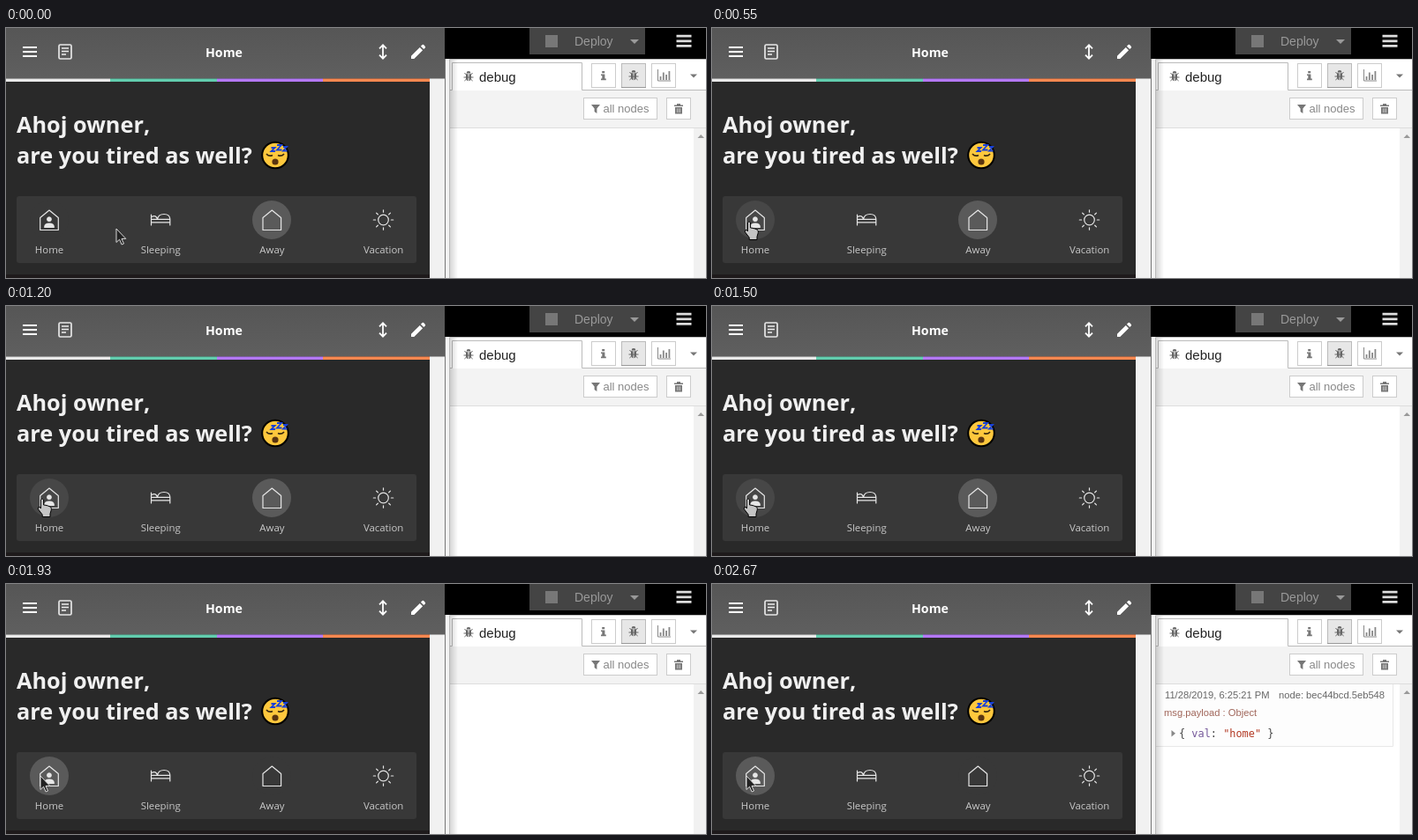
Recreate the animation shown at these times as an HTML page. Size 793x284 px, loop 2.73 s.

```html
<!DOCTYPE html>
<html lang="en">
<head>
<meta charset="utf-8">
<title>Dashboard and debug panel</title>
<style>
  html, body { margin: 0; width: 100%; height: 100%; overflow: hidden; background: #fff; }
  svg { display: block; width: 793px; height: 284px; }
  .ui { font-family: "Open Sans", "Noto Sans", sans-serif; }
  .side { font-family: "Liberation Sans", Arial, sans-serif; }
  .code { font: 11.9px "DejaVu Sans Mono", monospace; white-space: pre; }
  .head { font-size: 25.3px; font-weight: 700; fill: #f0f0f0; }
  .label { font-size: 11.4px; fill: #c8c8c8; text-anchor: middle; }
  .meta { font-size: 11.2px; fill: #666; }
  .line { fill: none; stroke: #e6e6e6; stroke-width: 1.2; stroke-linejoin: round; stroke-linecap: round; }
  .btn { fill: #fff; stroke: #ccc; }
  .cursor { stroke-width: 1; stroke-linejoin: round; }
</style>
</head>
<body>
<svg viewBox="0 0 793 284">
  <defs>
    <linearGradient id="bar" x2="0" y2="1">
      <stop stop-color="#565656"/><stop offset="1" stop-color="#5f5f5f"/>
    </linearGradient>
    <linearGradient id="shade">
      <stop stop-color="#000" stop-opacity=".16"/><stop offset="1" stop-color="#000" stop-opacity="0"/>
    </linearGradient>
    <path id="house" class="line" d="M38.7 215.5L49 207L59.3 215.5V229.5H38.7Z"/>
    <g id="bug" fill="#666" stroke="#666">
      <path d="M-2.4-3.6A2.4 2.4 0 0 1 2.4-3.6Z" stroke="none"/>
      <path d="M-3-2.8H-.5V5.2A3 3.6 0 0 1-3 1.6ZM3-2.8H.5V5.2A3 3.6 0 0 0 3 1.6Z" stroke="none"/>
      <path d="M-5.5 1H5.5M-4.6-4L-2.6-2M4.6-4L2.6-2M-4.6 5L-2.4 3M4.6 5L2.4 3" fill="none"/>
    </g>
  </defs>

  <g class="ui">
    <rect width="480" height="284" fill="#292929"/>
    <rect y="280" width="480" height="4" fill="#1e1a1b"/>
    <rect x="480" y="57" width="17" height="227" fill="#f1f1f1"/>
    <rect width="497" height="57.5" fill="url(#bar)"/>
    <g id="stripes"></g>

    <path d="M19 22H35M19 27H35M19 32H35" stroke="#fff" stroke-width="2"/>
    <rect x="60" y="19" width="14" height="16" rx="1.5" class="line" style="stroke-width:1.7"/>
    <path d="M63 23H71M63 26.5H71M63 30H68" stroke="#eee" stroke-width="1.4"/>
    <text x="247" y="32.5" text-anchor="middle" font-size="14.2" font-weight="700" fill="#fff">Home</text>
    <path d="M427 20V34M423 23.3L427 19.3L431 23.3M423 30.7L427 34.7L431 30.7" fill="none" stroke="#fff" stroke-width="1.8"/>
    <path d="M459 35V31.7L468.8 21.9L472.1 25.2L462.3 35ZM469.9 20.8L471.6 19.1Q472.4 18.6 473.1 19.1L474.9 20.9Q475.4 21.6 474.9 22.4L473.2 24.1Z" fill="#fff"/>

    <text class="head" x="12" y="119">Ahoj owner,</text>
    <text class="head" x="12" y="154">are you tired as well?</text>
    <circle cx="305" cy="144.5" r="14.8" fill="#ffc83d" stroke="#000" stroke-width="2"/>
    <path d="M295 143Q298 146.5 302 144.5M308 144.5Q312 146.5 315 143" fill="none" stroke="#3a2a10" stroke-width="1.7"/>
    <ellipse cx="305" cy="152" rx="3.6" ry="3.6" fill="#5a3510"/>
    <path d="M300.5 136H304.5L300.5 140H305M307 133H312L307 138.5H312.5M314 135H318L314 139.5H318.5" fill="none" stroke="#1740d8" stroke-width="1.8"/>

    <rect x="12" y="191" width="453" height="76" rx="3" fill="#383838"/>
    <circle id="homeDisc" cx="49" cy="218" r="22" fill="#383838"/>
    <circle id="awayDisc" cx="301" cy="218" r="22" fill="#5a5a5a"/>
    <use href="#house"/>
    <path d="M49 214.3A2.9 2.9 0 1 1 48.9 214.3ZM43.2 227V225.2Q43.6 221.4 49 221.4T54.8 225.2V227Z" fill="#e6e6e6"/>
    <path class="line" d="M164.5 212V224M164.5 220.8H185.8M185.8 224V217Q185.5 211.5 179 211.5Q172.5 211.5 171.5 217.3M164.5 217.3H185.8M165 214.5Q170 212 171.5 217"/>
    <use href="#house" x="252.3"/>
    <circle class="line" cx="427.5" cy="218" r="5.8"/>
    <g id="rays" class="line"></g>
    <g id="labels"></g>
  </g>

  <g class="side">
    <rect x="497" width="296" height="35" fill="#000"/>
    <rect x="593" width="131" height="30" fill="#444"/>
    <rect x="611" y="8" width="14" height="14" fill="#777"/>
    <text x="644" y="20" font-size="14" fill="#999">Deploy</text>
    <path d="M707 13H717L712 18Z" fill="#999"/>
    <path d="M759.5 9.2H776.5M759.5 14.8H776.5M759.5 20.4H776.5" stroke="#ddd" stroke-width="2.8"/>

    <rect x="497" y="35" width="296" height="249" fill="#fff"/>
    <rect x="498" y="35" width="4" height="249" fill="#f3f3f3"/>
    <path d="M497.5 35V284" stroke="#777"/>
    <rect x="502" y="71" width="291" height="42" fill="#f3f3f3"/>
    <path d="M502 113.5H793" stroke="#ddd"/>
    <path d="M502.5 284V35.5H793" stroke="#bbb" fill="none"/>
    <path d="M503 70.5H505.5V39.5H652.5V70.5H793" stroke="#bbb" fill="none"/>
    <use href="#bug" x="524" y="55"/>
    <text x="536" y="60.5" font-size="15" fill="#222">debug</text>

    <rect class="btn" x="663.5" y="40.5" width="27" height="27"/>
    <rect class="btn" x="697.5" y="40.5" width="27" height="27" style="fill:#e7e7e7;stroke:#bbb"/>
    <path d="M697 67.5H725" stroke="#999"/>
    <rect class="btn" x="731.5" y="40.5" width="27" height="27"/>
    <path d="M675.2 49H678.2V51.2H675.2ZM674 52.5H678.4V57.6H679.8V59.2H674V57.6H675.3V54H674Z" fill="#777"/>
    <use href="#bug" x="711" y="54"/>
    <path d="M738.5 47V60H753" fill="none" stroke="#888"/>
    <path d="M741.5 59V55M744.8 59V50.5M748.1 59V53M751.4 59V49" stroke="#888" stroke-width="1.8"/>
    <path d="M775 52.5H783L779 56.5Z" fill="#777"/>

    <rect class="btn" x="654.5" y="79.5" width="83" height="24"/>
    <path d="M663 87H673L669.4 91.5V97L666.6 95V91.5Z" fill="#777"/>
    <text x="676.5" y="96" font-size="13" fill="#888">all nodes</text>
    <rect class="btn" x="748.5" y="79.5" width="27" height="24"/>
    <path d="M757 87.5H760V86H764V87.5H767V89H757ZM758 90H766V97.5H758Z" fill="#777"/>
    <path d="M760.3 91.3V96M762 91.3V96M763.7 91.3V96" stroke="#ddd" stroke-width=".7"/>

    <rect x="779" y="114" width="14" height="170" fill="#f1f1f1"/>
    <path d="M783.5 125H791L787.2 121Z" fill="#999"/>

    <g id="message" opacity="0">
      <rect id="flash" x="503" y="114" width="276" height="71" fill="#fff"/>
      <rect x="511" y="114" width="260" height="70" fill="#fdfdfd"/>
      <path d="M503 184.5H771.5V114" fill="none" stroke="#e8e8e8"/>
      <text class="meta" x="513" y="130">11/28/2019, 6:25:21 PM</text>
      <text class="meta" x="642" y="130">node: bec44bcd.5eb548</text>
      <text class="meta" x="512" y="150" style="fill:#a0665a">msg.payload : Object</text>
      <path d="M520.5 166L525 169.8L520.5 173.6Z" fill="#888"/>
      <text class="code" x="529" y="174" fill="#444">{ <tspan fill="#75589a">val</tspan>: <tspan fill="#b33a24">"home"</tspan> }</text>
    </g>
    <rect x="503" y="36" width="9" height="248" fill="url(#shade)"/>
  </g>

  <circle id="click" cx="39.5" cy="218" r="12" fill="#cdb51c" fill-opacity=".85" opacity="0"/>
  <g id="pointer">
    <path id="arrow" class="cursor" fill="#222" stroke="#ddd" d="M0 0V15.5L3.6 12.2L6.1 18L8.5 17L6 11.4H10.8Z"/>
    <path id="hand" class="cursor" fill="#c4c4c4" stroke="#000" opacity="0" d="M-1.6 1Q0-1.4 1.6 1V7L4 7.3L6.6 8L9.4 9.2Q10.5 10 10.3 12.5L9 17V20.5H.2V18L-4.6 11.8Q-4.8 8.8-2.8 9.2L-1.6 11Z"/>
  </g>
</svg>
<script>
  const LOOP = 2730;
  const $ = id => document.getElementById(id);

  // steps: [time in ms, value]; hold keeps each value until the next step
  function play(id, prop, steps, hold) {
    const all = [...steps, [LOOP, steps[steps.length - 1][1]]];
    $(id).animate(
      all.map(([t, v]) => ({ offset: t / LOOP, [prop]: v, easing: hold ? "steps(1, end)" : "linear" })),
      { duration: LOOP, iterations: Infinity }
    );
  }

  const stops = [0, 118, 239, 359, 480];
  $("stripes").innerHTML = ["#e9e9e9", "#62cdae", "#b478fa", "#fb8850"]
    .map((c, i) => `<rect x="${stops[i]}" y="57.5" width="${stops[i + 1] - stops[i]}" height="3.5" fill="${c}"/>`).join("");

  $("labels").innerHTML = ["Home", "Sleeping", "Away", "Vacation"]
    .map((s, i) => `<text class="label" x="${49 + 126.2 * i}" y="256">${s}</text>`).join("");

  $("rays").innerHTML = Array.from({ length: 8 }, (_, i) =>
    `<path d="M427.5 209.2V206.8" transform="rotate(${45 * i} 427.5 218)"/>`).join("");

  const path = [
    [0, 125, 228], [60, 119, 227], [130, 98, 224], [200, 74, 221], [270, 57, 219],
    [330, 50, 219], [400, 47, 219], [550, 42, 220], [630, 41, 220],
    [1120, 41, 220], [1200, 41, 219], [1710, 41, 219], [1770, 39, 218]
  ];
  play("pointer", "transform", path.map(([t, x, y]) => [t, `translate(${x}px, ${y}px)`]));
  play("arrow", "opacity", [[0, 1], [270, 0], [1770, 1]], true);
  play("hand", "opacity", [[0, 0], [270, 1], [1770, 0]], true);
  play("click", "opacity", [[0, 0], [700, 0], [770, 1], [980, 1], [1120, 0]]);
  play("homeDisc", "fill", [[0, "#383838"], [270, "#383838"], [330, "#3d3d3d"], [500, "#474747"], [1710, "#474747"], [1840, "#5a5a5a"]]);
  play("awayDisc", "fill", [[0, "#5a5a5a"], [1710, "#5a5a5a"], [1840, "#383838"]]);
  play("message", "opacity", [[0, 0], [2140, 1]], true);
  play("flash", "fill", [[0, "#eeeeee"], [2230, "#eeeeee"], [2450, "#ffffff"]]);
</script>
</body>
</html>
```
